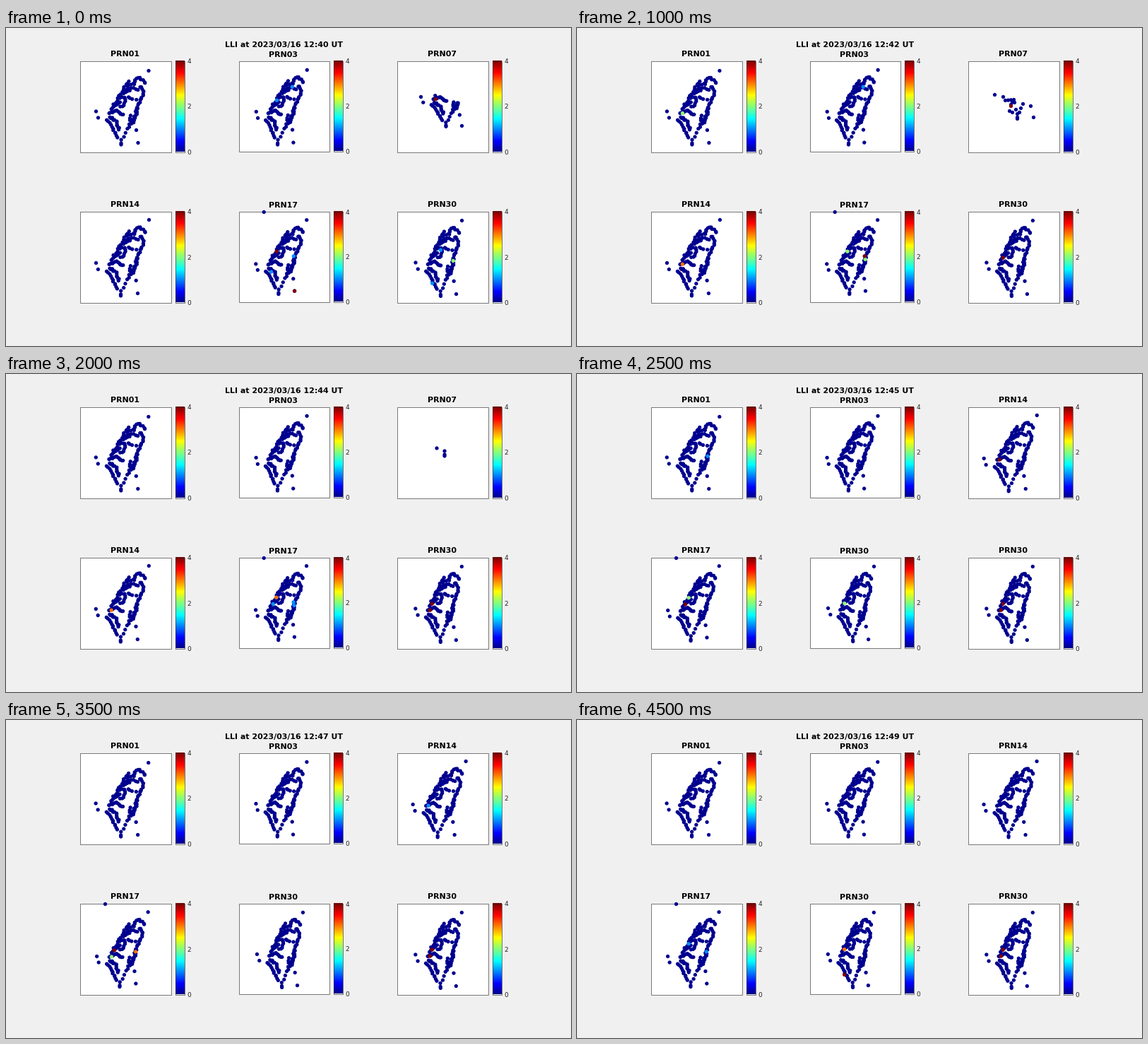
Write a matplotlib script that moves like this. It is 800 px wide and 450 px high and loops after 5 s.

```python
import numpy as np
import matplotlib
import matplotlib.pyplot as plt
from matplotlib.animation import FuncAnimation
from matplotlib.patches import Rectangle

matplotlib.rcParams["font.family"] = "DejaVu Sans"
W, H = 800, 450
FRAMES, STEP = 10, 500

# 64-step jet palette
level = np.arange(1, 65)[:, None] / 64
JET = np.clip(1.5 - np.abs(4 * level - np.array([3, 2, 1])), 0, 1)

# Lines of ground stations: number of stations, then waypoints
CHAINS = [
    (10, (180, 79), (182, 73), (187, 69), (197, 77)),
    (16, (189, 82), (195, 89), (184, 116)),
    (12, (184, 112), (183, 120), (172, 142)),
    (6, (186, 118), (180, 133)),
    (3, (177, 124), (175, 131)),
    (14, (173, 75), (163, 91), (149, 114)),
    (4, (169, 80), (180, 79)),
    (7, (168, 86), (181, 83), (187, 87)),
    (4, (165, 91), (175, 87)),
    (10, (160, 99), (168, 97), (167, 109), (161, 110)),
    (4, (172, 97), (183, 101)),
    (5, (152, 111), (162, 104)),
    (13, (145, 121), (154, 116), (166, 122)),
    (11, (143, 129), (151, 143), (158, 154)),
    (12, (147, 125), (155, 131), (160, 144)),
    (3, (163, 157), (169, 148)),
]
LONE = [(201.5, 60), (127, 117.5), (130, 126.5), (184, 144),
        (186.5, 162), (162.5, 162.5), (162.5, 164.5)]


def along(n, *path):
    path = np.array(path, float)
    dist = np.r_[0, np.hypot(*np.diff(path, axis=0).T).cumsum()]
    s = np.linspace(0, dist[-1], n)
    return np.c_[np.interp(s, dist, path[:, 0]), np.interp(s, dist, path[:, 1])]


rng = np.random.default_rng(4)
chain_pts = np.vstack([along(*c) for c in CHAINS])
chain_pts += rng.uniform(-1.2, 1.2, chain_pts.shape)
STATIONS = np.vstack([chain_pts, LONE]) - (104, 46)

# Where each satellite puts the west, north-east and south-east islands
ANCHORS = {
    "PRN01": [(23, 71.5), (97.5, 14), (82.5, 116)],
    "PRN03": [(25, 72.5), (97.5, 13), (78, 116.5)],
    "PRN07": [(34, 51), (101.5, 5.6), (92, 92)],
    "PRN14": [(23, 73), (98, 12), (82, 116)],
    "PRN17": [(24.5, 75), (97, 12.3), (79.7, 113.5)],
    "PRN30": [(26.5, 72.5), (92, 13), (84, 117)],
}
# Last stations in view of the setting satellite, longest visible first
SETTING = np.vstack([
    [(59, 71), (70, 75), (70, 80), (70, 82), (61, 64), (50, 51), (66, 59),
     (93, 80), (73, 73), (68, 69), (63, 73), (38, 48), (89, 64), (78, 61), (75, 67)],
    along(6, (53, 56), (65, 55), (61, 62))])
SETTING_LEFT = {2: 21, 3: 11, 4: 4}

SITES = {
    "A": (45, 74), "B": (48.8, 65), "C": (53.5, 56), "D": (79.5, 65),
    "E": (80.7, 69.8), "F": (46.5, 85), "G": (46.6, 100.5), "H": (82.5, 116),
    "I": (76.3, 37.5), "J": (88, 51.5), "K": (62.5, 54.5),
}
# Per minute: site letter and indicator value for each satellite
HITS = [
    {"PRN03": "C1 I1", "PRN07": "A4", "PRN17": "C4 D1 F1 H4", "PRN30": "K1 E2 G1"},
    {"PRN01": "A2 E1", "PRN03": "I2 J2", "PRN17": "D1 H4", "PRN30": "B1 G1"},
    {"PRN01": "A2", "PRN03": "I1", "PRN14": "A3", "PRN17": "C2 D4 E2", "PRN30": "B4"},
    {"PRN14": "A3", "PRN17": "C2 D1", "PRN30": "B4"},
    {"PRN14": "A3", "PRN17": "C3 B1 D1 E1", "PRN30": "B4 A4"},
    {"PRN01": "E1", "PRN14": "A4", "PRN17": "C2 B4", "PRN30": "B2"},
    {"PRN14": "A2", "PRN17": "B4"},
    {"PRN14": "A1", "PRN17": "B4 A2 E3"},
    {"PRN17": "B1"},
    {"PRN17": "C1 E1", "PRN30": "B3 G4"},
]
EARLY = ["PRN01", "PRN03", "PRN07", "PRN14", "PRN17", "PRN30"]
LATE = ["PRN01", "PRN03", "PRN14", "PRN17", "PRN30", "PRN30"]
SWITCH = 5


def project(sat, pts):
    base = np.c_[ANCHORS["PRN01"], np.ones(3)]
    m = np.linalg.solve(base, np.array(ANCHORS[sat], float))
    return np.c_[pts, np.ones(len(pts))] @ m


def colour(value):
    return JET[min(int(value * 16), 63)]


def dots(sat, minute):
    """Positions and colours of one satellite's markers."""
    if sat == "PRN07" and minute >= 2:
        late = minute - 2
        pts = SETTING[:SETTING_LEFT[minute]] - np.array([1.25, 6.25]) * late
        vals = np.zeros(len(pts))
        if minute == 2:
            vals[4] = 4
    else:
        base = STATIONS
        shift = np.array([-0.05 * minute, 0])
        if sat == "PRN07":
            horizon = 67 + 6 * minute + 0.27 * (base[:, 0] - 46)
            base = base[base[:, 1] > horizon]
            shift = np.array([0.3, -5.3]) * minute
        hits = HITS[minute].get(sat, "").split()
        sites = np.array([SITES[h[0]] for h in hits]).reshape(-1, 2)
        pts = project(sat, np.vstack([base, sites])) + shift
        vals = np.r_[np.zeros(len(base)), [int(h[1]) for h in hits]]
        if sat == "PRN17":
            pts = np.vstack([[36, 1], pts])
            vals = np.r_[0, vals]
    order = np.argsort(vals, kind="stable")
    return pts[order], [colour(v) for v in vals[order]]


fig = plt.figure(figsize=(W / 72, H / 72), dpi=72, facecolor="#f0f0f0")
ax = fig.add_axes([0, 0, 1, 1])
ax.axis("off")


def make_panel(col, row):
    mid = col == 1
    x, y = (104.5, 329.5, 553.5)[col], (46.5, 259.5)[row]
    size = 128 if mid else 129
    ax.add_patch(Rectangle((x, y), size, size, fc="white", ec="#262626", lw=0.6))

    bx, by = (239.5, 463.5, 688.5)[col], y + mid * 0.5
    bar_h = size - mid * 0.5
    ax.imshow(JET[::-1, None, :], extent=(bx, bx + 13, by + bar_h, by),
              aspect="auto", interpolation="nearest", zorder=2)
    ax.add_patch(Rectangle((bx, by), 13, bar_h, fc="none", ec="#262626",
                           lw=0.6, zorder=3))
    for v in (0, 2, 4):
        ax.text(bx + 16.7, by + bar_h * (1 - v / 4) + 3.5, str(v), size=9,
                color="#262626", va="baseline")
    title = ax.text(x + size / 2 - 0.7, y - 6.5 + mid, "", size=11, weight="bold",
                    ha="center", va="baseline")
    marks = ax.scatter([], [], s=28, linewidths=0, zorder=4)
    return (x, y), size / 129, title, marks


panels = [make_panel(c, r) for r in range(2) for c in range(3)]
clock = ax.text(393.5, 27, "", size=11, weight="bold", ha="center", va="baseline")
ax.set_xlim(0, W)
ax.set_ylim(H, 0)


def draw(i):
    clock.set_text(f"LLI at 2023/03/16 12:{40 + i} UT")
    sats = EARLY if i < SWITCH else LATE
    for k, (sat, (corner, scale, title, marks)) in enumerate(zip(sats, panels)):
        # the last panel is no longer refreshed after the switch
        minute = min(i, SWITCH - 1) if k == 5 else i
        pts, cols = dots(sat, minute)
        title.set_text(sat)
        marks.set_offsets(pts * scale + corner)
        marks.set_facecolor(cols)
    return []


anim = FuncAnimation(fig, draw, frames=FRAMES, interval=STEP, repeat=True,
                     repeat_delay=0, blit=False)
plt.show()
```
